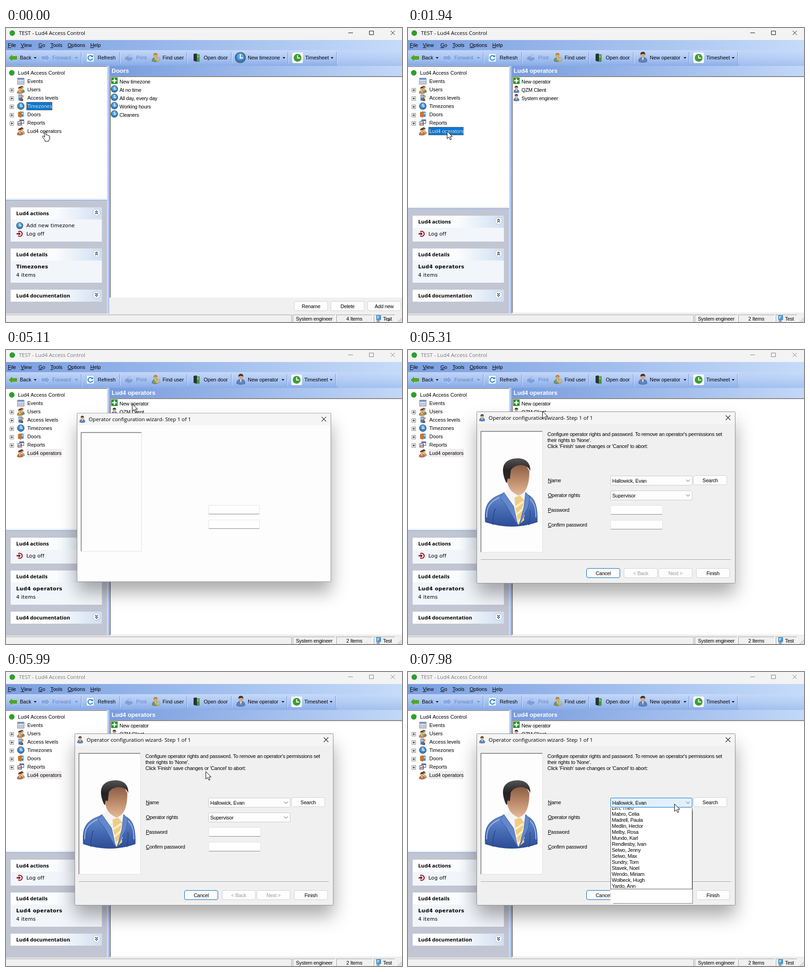
These frames come from a looping animation (855x636 px, 8000 ms). An HTML page:

```html
<!DOCTYPE html>
<html lang="en">
<head>
<meta charset="utf-8">
<title>Access control</title>
<style>
html, body { margin: 0; width: 100%; height: 100%; overflow: hidden; background: #f0f0f0; }
svg { display: block; position: absolute; left: 0; top: 0; }
text { white-space: pre; fill: #000; }
.ui { font: 11px "Liberation Sans", Arial, sans-serif; }
.ms { font: 11px "Liberation Sans", Arial, sans-serif; letter-spacing: -.25px; }
.head { font: bold 13px "Liberation Sans", Arial, sans-serif; fill: #fff; }
.title { font: 11.5px "Open Sans", "Noto Sans", sans-serif; }
.cap { font: bold 11.2px "Open Sans", "Noto Sans", sans-serif; }
.side { font: 11px "DejaVu Sans", Verdana, sans-serif; letter-spacing: .15px; }
.sideb { font: bold 11px "DejaVu Sans", Verdana, sans-serif; letter-spacing: .35px; }
.mid { text-anchor: middle; }
.dim { fill: #6484bd; }
.off { fill: #9a9a9a; }
.inv { fill: #fff; }
.u { text-decoration: underline; }
</style>
</head>
<body>
<svg id="stage" width="855" height="636" viewBox="0 0 855 636"></svg>
<script>
const LOOP = 8000, APP = 'Lud4', BLUE = '#0078d7';

// drawing helpers
const rect = (x, y, w, h, fill, more = '') =>
  `<rect x="${x}" y="${y}" width="${w}" height="${h}" fill="${fill}" ${more}/>`;
const box = (x, y, w, h, fill, line, r = 0) =>
  rect(x + .5, y + .5, w - 1, h - 1, fill, `stroke="${line}" rx="${r}"`);
const path = (d, fill = 'none', line = 'none', w = 1) =>
  `<path d="${d}" fill="${fill}" stroke="${line}" stroke-width="${w}"/>`;
const disc = (x, y, r, fill, line = 'none', w = 1) =>
  `<circle cx="${x}" cy="${y}" r="${r}" fill="${fill}" stroke="${line}" stroke-width="${w}"/>`;
const text = (x, y, s, cls = 'ui') => `<text x="${x}" y="${y}" class="${cls}">${s}</text>`;
const key = (x, y, s, cls = 'ui') => text(x, y, `<tspan class="u">${s[0]}</tspan>${s.slice(1)}`, cls);
const group = (id, ...parts) => `<g id="${id}">${parts.join('')}</g>`;
const ramp = (id, stops, down) =>
  `<linearGradient id="${id}" x2="${down ? 0 : 1}" y2="${down ? 1 : 0}">` +
  stops.map((c, i) => `<stop offset="${i / (stops.length - 1)}" stop-color="${c}"/>`).join('') + '</linearGradient>';
const button = (x, y, s, { line = '#d0d0d0', cls = '', w = 73 } = {}) =>
  box(x, y, w, 21, '#fdfdfd', line, 3.5) + text(x + w / 2, y + 15, s, 'ms mid ' + cls);
const selected = (x, y, w) =>
  box(x, y, w, 18, BLUE, '#e8a35a') + `<rect x="${x + .5}" y="${y + .5}" width="${w - 1}" height="17" fill="none" stroke="#003a70" stroke-dasharray="1 1"/>`;

// icons on a 16 px grid
const bust = (x, y, coat, hair) =>
  path(`M${x} ${y + 14}q0-6 5-6h2q5 0 5 6q-6 2.500-12 0z`, coat, '#35507f', .5) +
  path(`M${x + 4.5} ${y + 8}h3l-1.500 5z`, '#f4e3b0') +
  disc(x + 6, y + 4, 3.6, '#d9a77c') + path(`M${x + 2.4} ${y + 4}q0-4 3.600-4t3.600 4q-3-2-7.200 0z`, hair);
const icons = {
  clock: disc(8, 8, 7.3, '#2f7fc4', '#54606e', 1.2) + disc(8, 6.5, 5, '#5aa6e0') + path('M8 3V8.500H12', 'none', '#fff', 1.5),
  person: bust(2, 1, '#5d84c4', '#3a3432'),
  users: bust(4, 0, '#6b9a4c', '#8a5a2c') + bust(0, 2, '#d08a3e', '#54391f'),
  staff: bust(4, 0, '#e0a04a', '#54391f') + bust(0, 2, '#c9733a', '#3c2a20'),
  events: box(.5, 1, 15, 14, '#fff', '#5a6f94') + rect(1, 2, 14, 3, '#7d9bd0') + path('M1 8.500H15M1 11.500H15M4.500 5V15M8.500 5V15M12 5V15', 'none', '#8797b3'),
  levels: rect(3, 1, 8, 13, '#4b79b8') + rect(4, 2, 4, 6, '#9cc3ea') + disc(11, 5, 3, '#d59a52') + path('M7 15q1-6 6-5v5z', '#6e5a50'),
  doors: path('M2 3L9 1V15L2 13z', '#c9762c') + rect(9, 2, 5, 11, '#4d8ac4') + rect(10, 4, 3, 4, '#a9d3f2'),
  reports: box(5, 1, 10, 9, '#fff', '#3a4d73') + rect(5, 1, 10, 3, '#3f63a8') + box(1, 5, 9, 9, '#e9eef7', '#3a4d73') + path('M3 12V9M5.500 12V8M8 12V7', 'none', '#b4532d', 1.5),
  add: rect(1, 1, 14, 14, '#27962c') + path('M8 3V13M3 8H13', 'none', '#fff', 2.6),
  exit: path('M5 3A6 6 0 1 1 5 13', 'none', '#a3202a', 2.6) + path('M11 8L6 4V6.500H1V9.500H6V12z', '#7a1620'),
  arrow: path('M0 8L8 0V4H18V12H8V16z', 'currentColor', '#ffffff70', 1),
  refresh: rect(0, 0, 16, 18, '#f8fbff', 'stroke="#9bb3d8" rx="1"') + path('M12.500 7A5 5 0 1 0 13 11', 'none', '#2d86cf', 2.2) + path('M14 3V8H9z', '#2d86cf'),
  print: path('M1 8L8 4L17 8V12L10 16L1 12z', '#7f9fd8') + path('M7 1L14 0L16 7L9 8z', '#a9c2ee'),
  find: bust(1, 0, '#7a9a55', '#b5862f') + disc(11, 11, 3.5, '#cfe4f588', '#c7a23a', 1.5),
  door: path('M1 1L8 0V18L1 16z', '#2b3037') + rect(8, 2, 6, 16, '#3c9a3b') + rect(9, 4, 3, 5, '#80cc70'),
  sheet: rect(0, 0, 23, 23, '#fdfdfd', 'rx="3"') + disc(11.5, 11.5, 8.5, '#3f9c35') + path('M11.500 6V12H17', 'none', '#fff', 2),
  screen: rect(3, 0, 9, 9, '#3f9fe0', 'stroke="#35689c"') + path('M4 1h6l-4 6h-2z', '#9cd6fa') + path('M2 12L7 9L11 12L7 14z', '#8796aa'),
};
const icon = (name, x, y, s = 1) => `<g transform="translate(${x} ${y}) scale(${s})">${icons[name]}</g>`;
const drop = (x, c = '#111') => path(`M${x} 63h6l-3 3.500z`, c);
const bar = x => path(`M${x + .5} 52V77`, 'none', '#6c8ccb') + path(`M${x + 1.5} 52V77`, 'none', '#e4eefd');
const chevron = (y, up) => disc(195.5, y, 7.5, '#fdfeff', '#a9bcd8') +
  path([-4, 0].map(o => `M192.500 ${y + o + (up ? 3.5 : .5)}l3 ${up ? -3 : 3}l3 ${up ? 3 : -3}`).join(''), 'none', '#1d2c50', 1.4);

const defs = '<defs>' +
  ramp('menu', ['#7a9fe0', '#c5dbf9']) + ramp('tools', ['#cbdcfa', '#abc6f4', '#86a9e6'], 1) +
  ramp('band', ['#789cde', '#c3d8f8']) + ramp('panel', ['#ffffff', '#fafcfe', '#d1dff0']) +
  ramp('gap', ['#dbe6fb', '#8fb0ea']) +
  ramp('suit', ['#7196d6', '#4a70b8', '#2c4c95'], 1) + ramp('skin', ['#84573f', '#b98767', '#e3bb9b'], 1) +
  ramp('hair', ['#565354', '#242223', '#2c2a2a'], 1) +
  '<clipPath id="listClip"><rect x="437" y="294" width="178" height="177"/></clipPath></defs>';

// main window
const menu = [[4, 'File'], [32, 'View'], [70, 'Go'], [96, 'Tools'], [133, 'Options'], [182, 'Help']];
const chrome =
  rect(0, 0, 855, 26, '#f3f3f3') + disc(13.5, 11, 6, '#2f9e2f') +
  group('caption', text(28, 15, `TEST - ${APP} Access Control`, 'title'),
    path('M739 10.500H749M784.500 6.500h9v8h-9zM830.500 6L839.500 15M839.500 6L830.500 15', 'none', '#111')) +
  rect(0, 26, 855, 56, 'url(#menu)') + menu.map(([x, s]) => key(x, 41, s)).join('') +
  rect(0, 48, 855, 34, 'url(#tools)', 'opacity=".5"') + rect(0, 48, 715, 34, 'url(#tools)', 'rx="2" opacity=".75"') +
  `<g style="color:#4ea52c">${icon('arrow', 5, 56, 1.08)}</g><g style="color:#86a9e4">${icon('arrow', 95, 56, '-1.08 1.08')}</g>` +
  text(30, 68, 'Back') + drop(60) + text(100, 68, 'Forward', 'ui dim') + drop(149, '#6484bd') + bar(162) +
  icon('refresh', 174, 55) + text(198, 68, 'Refresh') + bar(245) +
  icon('print', 256, 56) + text(281, 68, 'Print', 'ui dim') + icon('find', 314, 54, 1.25) + text(338, 68, 'Find user') + bar(390) +
  icon('door', 404, 55) + text(427, 68, 'Open door') + bar(486);
const toolTail = (name, img, x) => img + text(522, 68, name) + drop(x + 597) + bar(x + 608) +
  icon('sheet', x + 618, 53) + text(x + 646, 68, 'Timesheet') + drop(x + 701) + bar(x + 713);

const nodes = ['Events', 'Users', 'Access levels', 'Timezones', 'Doors', 'Reports', APP + ' operators'];
const nodeIcons = ['events', 'users', 'levels', 'clock', 'doors', 'reports', 'staff'];
const tree = disc(12.5, 97, 6, '#2f9e2f') + text(26, 101, APP + ' Access Control') + nodes.map((s, i) => {
  const y = 119 + i * 18, c = y - 3;
  return icon(nodeIcons[i], 24, y - 12) + text(46, y, s) + (i > 0 && i < 6 ?
    box(8, c - 4, 9, 9, '#fff', '#848484') + path(`M10 ${c + .5}h5M12.500 ${c - 2}v5`, 'none', '#000') : '');
}).join('');

const panel = (y, h, s, up) => rect(10, y, 197, 26, 'url(#panel)', 'rx="1"') +
  (h ? rect(10, y + 26, 197, h, '#f2f5fa') : '') + text(22, y + 17, s, 'cap') + chevron(y + 11, up);
const rows = (list, img) => icon('add', 226, 106) + list.map((s, i) =>
  (i ? icon(img, 226, 106 + i * 18) : '') + text(245, 120 + i * 18, s, 'ms')).join('');

const left = rect(0, 82, 219, 536, '#c2c6d3') + rect(218, 82, 6, 536, 'url(#gap)') +
  `<rect id="treePane" x="0" y="84" width="218" fill="#fff"/>` + path('M0 83.500H218', 'none', '#696969') +
  group('splitter', rect(0, 369, 219, 3, '#e8eefa') + rect(0, 372, 219, 1, '#7fa0e0')) +
  group('selTime', selected(44, 160, 56)) + group('selOps', selected(44, 214, 76)) + group('greyOps', rect(44, 214, 76, 18, '#f0eeee')) +
  tree + group('selTimeText', text(46, 173, 'Timezones', 'ui inv')) + group('selOpsText', text(46, 227, nodes[6], 'ui inv')) +
  rect(10, 430, 197, 32, '#f2f5fa') + group('actions', panel(388, 22, APP + ' actions', 1)) +
  group('addZone', icon('clock', 22, 420, .95) + text(44, 431, 'Add new timezone', 'side')) +
  icon('exit', 22, 438, .9) + text(44, 449, 'Log off', 'side') +
  panel(477, 48, APP + ' details', 1) + text(22, 538, '4 items', 'side') + panel(566, 0, APP + ' documentation', 0);

const right = rect(224, 82, 631, 22, 'url(#band)') + rect(224, 104, 631, 512, '#fff') +
  path('M224.500 616V104.500H855', 'none', '#a0a0a0') + path('M225.500 616V105.500H855', 'none', '#696969') +
  path('M224 616.500H855', 'none', '#e3e3e3') +
  group('zones', toolTail('New timezone', icon('clock', 494, 52, 1.5), 0) + text(228, 97, 'Doors', 'head') +
    rows(['New timezone', 'At no time', 'All day, every day', 'Working hours', 'Cleaners'], 'clock') +
    text(22, 520, 'Timezones', 'sideb')) +
  group('ops', toolTail('New operator', icon('person', 495, 50, 1.5), -2) + text(228, 97, nodes[6], 'head') +
    rows(['New operator', 'QZM Client', 'System engineer'], 'person') + text(22, 520, nodes[6], 'sideb')) +
  group('picked', rect(227, 107, 15, 15, '#2b86d4') + path('M234.500 109V120M229 114.500H240', 'none', '#bfe0f8', 2) +
    selected(243, 106, 68) + text(245, 120, 'New operator', 'ms inv')) +
  group('footer', rect(223, 583, 632, 35, '#f0f0f0'), button(622, 591, 'Rename'), button(701, 591, 'Delete'), button(780, 591, 'Add new'));

const status = rect(0, 618, 855, 18, '#f0f0f0') + path('M0 620.500H616.500V636M619.500 636V620.500H710.500M713.500 636V620.500H791.500M794.500 636V620.500H840', 'none', '#a3a3a3') +
  path('M710.500 621V636M791.500 621V636M840.500 621V636', 'none', '#fff') +
  text(626, 633, 'System engineer', 'ms') + group('count4', text(752, 633, '4 Items', 'ms mid')) + group('count2', text(752, 633, '2 Items', 'ms mid')) +
  icon('screen', 797, 622) + text(814, 633, 'Test', 'ms') + path('M846 636L855 627M850 636L855 631', 'none', '#a0a0a0') +
  group('blob', path('M824 634l2-4 3 1-2 3z', '#444'));

// wizard
const man =
  path('M167 372C165 340 170 324 199 313L222 302H246L258 313C274 319 280 340 279 372Q225 391 167 372z', 'url(#suit)', '#2b4788') +
  path('M170 362C169 340 176 328 200 318M276 362Q277 330 260 320', 'none', '#9bb8e8', 2) +
  path('M207 308L222 298L251 303L257 313L249 352L238 378z', '#f4f4f5') +
  path('M230 319L242 315L251 325L247 341L251 368L239 378L232 343z', '#efcd80') +
  path('M232 340L249 328M234 356L249 343M238 371L251 357', 'none', '#fbf0cf', 4) +
  path('M207 308L198 319L212 336L237 379L228 338zM254 308L263 317L260 338L240 379L250 341z', '#6288cc', '#2f4f96', .8) +
  path('M183 378Q184 350 189 343M261 379Q265 355 263 346', 'none', '#2a4585', 1.5) +
  path('M214 268L215 288C218 299 221 306 238 315C256 310 262 290 262 262L252 244H222z', 'url(#skin)') +
  path('M211 285C202 264 200 240 228 235C252 231 265 243 264 262C260 252 252 249 243 249C232 250 226 254 222 260L220 279L215 278L214 288z', 'url(#hair)');
const combo = (y, s, id) => box(437, y, 177, 21, '#fdfdfd', '#c9c9c9', 2) + (id ? group(id, box(437, y, 177, 21, '#e3f0fb', BLUE, 2)) : '') +
  text(441, y + 15, s, 'ms') + path(`M600.500 ${y + 8.5}l4 4l4-4`, 'none', '#444');
const field = y => box(437, y, 113, 20, '#fff', '#e3e3e3', 1) + path(`M438 ${y + 19.5}H549`, 'none', '#868686');
const labels = ['Name', 'Operator rights', 'Password', 'Confirm password'];
const wizard = group('wizard',
  rect(149, 134, 558, 370, '#fff', 'style="filter:drop-shadow(0 24px 19px rgba(0,0,0,.33))"'),
  box(148, 133, 559, 372, '#fdfdfd', '#8e8e8e', 1),
  rect(149, 134, 557, 26, '#f5f5f5'), group('greyBody', rect(149, 160, 557, 344, '#f0f0f0')),
  icon('person', 152, 138), text(174, 151, 'Operator configuration wizard- Step 1 of 1', 'title'),
  path('M686 141.500L696 151.500M696 141.500L686 151.500', 'none', '#222', 1.1),
  rect(157, 175, 134, 263, '#fdfdfd'), path('M157.500 438V176H290', 'none', '#707070', 1.5), path('M290.500 176V437.500H157', 'none', '#e0e0e0'),
  field(336), field(368),
  group('form', man,
    text(301, 186, "Configure operator rights and password. To remove an operator's permissions set", 'ms'),
    text(301, 199, "their rights to 'None'.", 'ms'), text(301, 212, "Click 'Finish' save changes or 'Cancel' to abort:", 'ms'),
    labels.map((s, i) => key(302, 286 + 32 * i, s, 'ms')).join(''),
    combo(272, 'Hallowick, Evan', 'hover'), combo(304, 'Supervisor'), button(616, 271, 'Search'),
    path('M157 453.500H697', 'none', '#9a9a9a'), path('M157 454.500H697', 'none', '#fff'),
    button(385, 472, 'Cancel', { line: '#0067c0' }), button(466, 472, '&lt; Back', { cls: 'off' }),
    button(541, 472, 'Next &gt;', { cls: 'off' }), button(622, 472, 'Finish')));
const people = ['Lirn, Theo', 'Mabro, Celia', 'Madrell, Paula', 'Medlin, Hector', 'Melby, Rosa', 'Mundo, Karl', 'Rendlesby, Ivan',
  'Selwo, Jenny', 'Selwo, Max', 'Sundry, Tom', 'Stavek, Noel', 'Wendo, Miriam', 'Wolbeck, Hugh', 'Yardo, Ann'];
const names = group('names',
  rect(443, 300, 172, 201, '#7c7c7c'), rect(437, 294, 177, 206, '#fff'),
  '<g clip-path="url(#listClip)">', group('slide', box(437, 200, 177, 270, '#fff', '#555'),
    people.map((s, i) => text(440, 298 + 13 * i, s, 'ms')).join('')), '</g>');

const cursors = group('cursor', path('M.5 .5V16.500L4.300 13L7 19L9.500 18L7 12H12z', '#fff', '#000')) +
  group('hand', path('M83.500 236V226q0-2 1.500-2t1.500 2v5q3-.5 3 1q2.500-.5 2.500 1q2.500 0 2.500 2v4q0 2-2 3.500v2.500H84v-2.500L79 236q-1-2 1-2.500q1.500 0 3.500 3', '#fff', '#000'));

const stage = document.getElementById('stage');
stage.innerHTML = defs + chrome + left + right + status + wizard + names + cursors;

// motion
const $ = Object.fromEntries([...stage.querySelectorAll('[id]')].map(e => [e.id, e]));
const show = (id, on) => { $[id].style.display = on ? '' : 'none'; };
const steps = (t, from, to, n) =>
  Math.max(0, Math.min(n, Math.floor((t - from) / (to - from || 1) * (n - 1) + 1e-6) + 1)) / n;
const ease = p => p * p * (3 - 2 * p);

// from, to, steps, x, y
const moves = [
  [2460, 2460, 1, 85, 222], [2800, 3130, 6, 283, 103], [3330, 3400, 2, 280, 110],
  [4640, 5110, 7, 272, 116], [5180, 5450, 5, 322, 161], [5650, 6400, 11, 575, 285],
];

function draw(t) {
  let x = 84, y = 223;
  for (const [a, b, n, tx, ty] of moves) {
    if (t < a) break;
    const p = n > 1 ? ease(steps(t, a, b, n)) : 1;
    x += (tx - x) * p;
    y += (ty - y) * p;
  }
  $.cursor.setAttribute('transform', `translate(${Math.round(x)} ${Math.round(y)})`);
  show('hand', t < 460);
  show('cursor', t >= 460);
  show('blob', t < 380);

  const chosen = t >= 1120, loaded = t >= 1340, opened = t >= 3920;
  for (const s of ['', 'Text']) {
    show('selTime' + s, !chosen);
    show('selOps' + s, chosen && !opened);
  }
  show('greyOps', opened);
  for (const id of ['zones', 'count4', 'addZone']) show(id, !loaded);
  for (const id of ['ops', 'count2']) show(id, loaded);
  show('footer', t < 1940);
  show('picked', opened && t < 4060);

  const dy = 18 * ease(steps(t, 1490, 1870, 6));
  $.treePane.setAttribute('height', 285 + dy);
  $.splitter.setAttribute('transform', `translate(0 ${dy})`);
  $.actions.setAttribute('transform', `translate(0 ${dy})`);

  const k = steps(t, 5040, 5250, 4), s = .964 + .036 * k;
  show('wizard', k > 0);
  show('form', k === 1);
  show('greyBody', k === 1);
  $.wizard.style.opacity = Math.min(1, k * 2);
  $.wizard.setAttribute('transform', `translate(${427 * (1 - s)} ${319 * (1 - s)}) scale(${s})`);
  $.caption.style.opacity = k > 0 ? .5 : 1;

  $.hover.style.opacity = steps(t, 6460, 6530, 2);
  show('names', t >= 7910);
  $.slide.setAttribute('transform', `translate(0 ${t < 7980 ? -74 : 0})`);
}

const start = performance.now();
function tick() {
  draw((performance.now() - start) % LOOP);
  requestAnimationFrame(tick);
}
tick();
</script>
</body>
</html>
```
